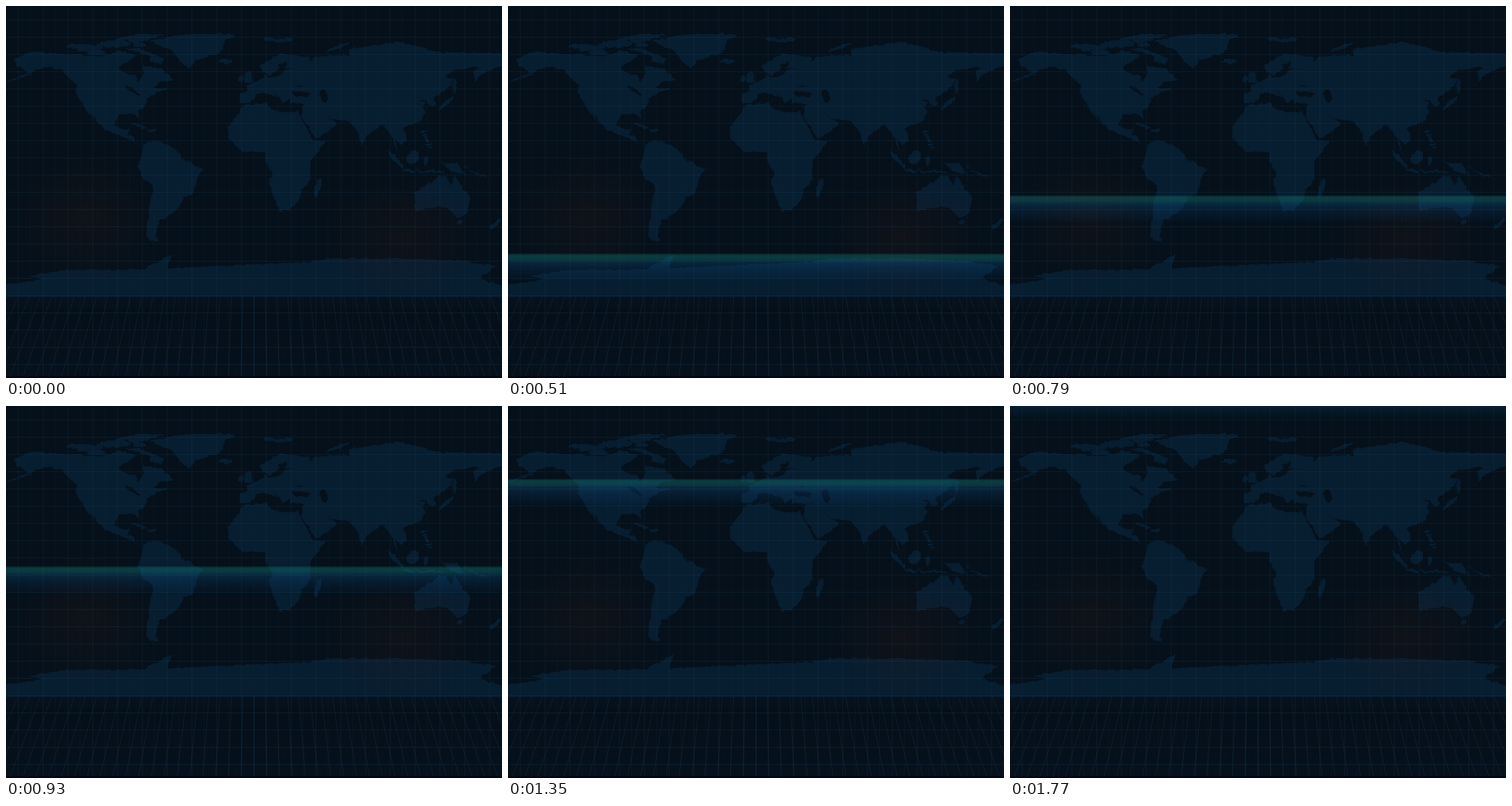
These frames come from a looping animation (864x648 px, 7.51 s). An HTML page:

```html
<!DOCTYPE html>
<html lang="en">
<head>
<meta charset="utf-8">
<title>World scan</title>
<style>
  html, body { margin: 0; width: 100%; height: 100%; overflow: hidden; background: #05101a; }
  svg { display: block; }
  #stage { width: 100vw; height: 100vh; }
  .land { fill: #071d30; }
  .water { fill: #05101a; }
  .beam { animation: scan 7510ms infinite; }
  @keyframes scan {
    0% { opacity: 0; transform: translateY(532.7px); animation-timing-function: step-end; }
    3.0626% { opacity: 1; transform: translateY(532.7px); animation-timing-function: steps(22); }
    23.5686%, 100% { opacity: 1; transform: translateY(-25.1px); }
  }
</style>
</head>
<body>
<svg id="stage" viewBox="0 0 864 648" preserveAspectRatio="none">
  <defs>
    <pattern id="columns" width="43.2" height="648" patternUnits="userSpaceOnUse">
      <path d="M21.5 0V648" stroke="#2a6f93" stroke-opacity=".15"/>
      <path d="M42.5 0V648" stroke="#2a6f93" stroke-opacity=".07"/>
    </pattern>
    <pattern id="rows" y="24" width="864" height="30" patternUnits="userSpaceOnUse">
      <path d="M0 .5H864" stroke="#2a6f93" stroke-opacity=".16"/>
    </pattern>
    <radialGradient id="ember">
      <stop stop-color="#3a1c16" stop-opacity=".2"/>
      <stop offset="1" stop-color="#3a1c16" stop-opacity="0"/>
    </radialGradient>
    <linearGradient id="light" x2="0" y2="1">
      <stop stop-color="#169088" stop-opacity=".1"/>
      <stop offset=".06" stop-color="#169088" stop-opacity=".34"/>
      <stop offset=".2" stop-color="#158c88" stop-opacity=".33"/>
      <stop offset=".3" stop-color="#12689a" stop-opacity=".27"/>
      <stop offset=".5" stop-color="#0f599c" stop-opacity=".18"/>
      <stop offset="1" stop-color="#0f599c" stop-opacity="0"/>
    </linearGradient>
    <linearGradient id="ground" x2="0" y2="1">
      <stop stop-color="#07131e" stop-opacity=".8"/>
      <stop offset=".16" stop-color="#06101a" stop-opacity=".9"/>
      <stop offset=".26" stop-color="#050f19"/>
      <stop offset="1" stop-color="#06111d"/>
    </linearGradient>
    <filter id="coast" filterUnits="userSpaceOnUse" x="-20" y="0" width="920" height="530" color-interpolation-filters="sRGB">
      <feTurbulence type="fractalNoise" baseFrequency=".11" numOctaves="2" seed="4"/>
      <feDisplacementMap in="SourceGraphic" scale="7" xChannelSelector="R" yChannelSelector="G"/>
    </filter>
  </defs>

  <rect class="water" width="864" height="648"/>
  <svg width="864" height="507">
    <g id="map" filter="url(#coast)" transform="translate(2.7) scale(.988 1)"></g>
  </svg>
  <ellipse cx="140" cy="370" rx="130" ry="120" fill="url(#ember)"/>
  <ellipse cx="690" cy="400" rx="140" ry="110" fill="url(#ember)"/>

  <rect class="beam" width="864" height="50" fill="url(#light)"/>

  <rect y="507" width="864" height="141" fill="url(#ground)"/>
  <path id="fan" fill="none" stroke="#29617d" stroke-opacity=".22"/>
  <path d="M432.5 507V648" stroke="#0c5a85" stroke-opacity=".35"/>
  <path d="M0 530.5H864" stroke="#030a12" stroke-opacity=".6"/>
  <rect width="864" height="648" fill="url(#columns)"/>
  <rect width="864" height="648" fill="url(#rows)"/>
  <rect y="645" width="864" height="3" fill="#01040a" fill-opacity=".8"/>
</svg>
<script>
  const map = document.getElementById('map');

  function add(tag, attributes) {
    const node = document.createElementNS('http://www.w3.org/2000/svg', tag);
    for (const name in attributes) node.setAttribute(name, attributes[name]);
    map.append(node);
  }
  const land = points => add('polygon', { class: 'land', points });
  const oval = (cx, cy, rx, ry, turn = 0, kind = 'land') =>
    add('ellipse', { class: kind, cx, cy, rx, ry, transform: `rotate(${turn} ${cx} ${cy})` });

  // Small islands strewn along a line
  let seed = 7;
  const random = () => (seed = seed * 16807 % 2147483647) / 2147483647;
  function islands(x, y, endX, endY, count, size, spread) {
    for (let i = 0; i < count; i++) {
      const t = (i + .5) / count;
      const dy = (random() - .5) * spread;
      oval(x + (endX - x) * t, y + (endY - y) * t + dy, size * (.7 + random()), size * .45);
    }
  }

  // North America
  land('12 93 41 79 95 84 162 88 197 78 227 85 215 95 197 106 198 113 226 122 232 133 240 117 238 103 258 107 271 108 292 128 267 134 257 143 282 144 265 151 246 160 242 174 230 183 232 199 224 188 196 189 188 207 205 217 215 210 211 224 223 227 223 238 238 244 213 232 168 213 145 183 158 206 139 181 121 153 121 138 94 111 64 106 21 123 37 115 17 105');
  // Baffin, Ellesmere, Greenland
  land('207 75 232 73 277 92 271 101 250 96 250 87');
  land('202 54 245 48 277 50 222 67');
  land('250 61 295 80 299 90 318 109 332 95 375 81 385 59 402 53 375 47 305 50');
  // South America
  land('238 243 253 234 277 238 303 256 307 266 345 284 335 300 327 326 311 334 298 355 289 362 268 374 260 402 269 411 253 409 244 400 248 363 257 313 242 303 229 279 239 256');
  // Africa
  land('417 172 457 169 459 177 482 185 513 184 539 235 560 235 532 274 534 305 519 318 514 340 496 355 479 357 461 308 466 290 454 269 456 256 446 254 413 254 389 230 390 210 408 185');
  // Northern Eurasia
  land('428 152 420 139 453 125 452 117 459 124 479 123 492 111 507 109 487 109 494 96 476 104 478 109 464 121 449 114 444 105 479 83 534 90 532 97 542 87 602 85 602 75 692 62 757 80 880 83 880 100 837 118 824 132 822 118 832 106 790 111 771 123 785 127 780 141 600 155 520 138 440 149');
  // Southern Eurasia
  land('780 140 751 162 755 172 748 176 736 164 727 164 738 169 731 174 737 185 731 199 697 212 705 233 694 243 683 231 691 262 676 224 661 207 632 227 626 245 614 214 599 200 574 198 552 187 572 198 581 207 544 232 518 192 522 170 499 169 498 161 487 169 466 146 478 161 458 152 440 153 427 170 409 169 409 153 445 140');
  // Britain, New Guinea, Australia, Antarctica
  land('418 135 435 132 427 113 418 117');
  land('760 268 771 274 792 274 808 294 782 289');
  land('717 324 737 313 762 296 774 298 782 312 787 294 814 331 816 343 807 364 792 369 776 352 759 349 719 357');
  land('-10 487 63 475 36 471 92 461 240 458 290 432 282 457 530 446 565 439 690 440 800 443 862 453 833 475 880 488 880 520 -10 520');

  oval(156, 81, 17, 5);
  oval(384, 96, 13, 4);
  oval(412, 127, 5, 5);
  oval(233, 209, 14, 2.5, 20);
  oval(254, 217, 8, 2.5);
  oval(547, 317, 5, 18, 17);
  oval(582, 72, 22, 3, -20);
  oval(684, 267, 20, 4, 49);
  oval(707, 287, 12, 2.5, 8);
  oval(715, 264, 9, 14, 35);
  oval(737, 271, 4, 9);
  oval(773, 169, 17, 4, -40);
  oval(788, 139, 3, 14);
  oval(798, 376, 5, 4);
  oval(860, 380, 14, 4, -40);

  islands(115, 75, 200, 64, 12, 8, 10);
  islands(172, 60, 236, 62, 8, 9, 14);
  islands(0, 131, 40, 118, 10, 3, 1);
  islands(455, 59, 500, 57, 5, 7, 6);
  islands(733, 216, 746, 250, 8, 4, 4);
  islands(720, 288, 770, 288, 8, 4, 3);
  islands(805, 280, 845, 300, 8, 3, 4);

  // Black Sea, Caspian, Great Lakes
  oval(518, 153, 16, 5, 5, 'water');
  oval(558, 157, 6, 12, -15, 'water');
  oval(220, 147, 15, 2.5, 35, 'water');

  // Floor lines spread away from the centre
  let fan = '';
  for (let i = -24; i <= 24; i++) {
    if (i) fan += `M${432 + i * 19.6} 507L${432 + i * 22.4} 648`;
  }
  document.getElementById('fan').setAttribute('d', fan);
</script>
</body>
</html>
```
